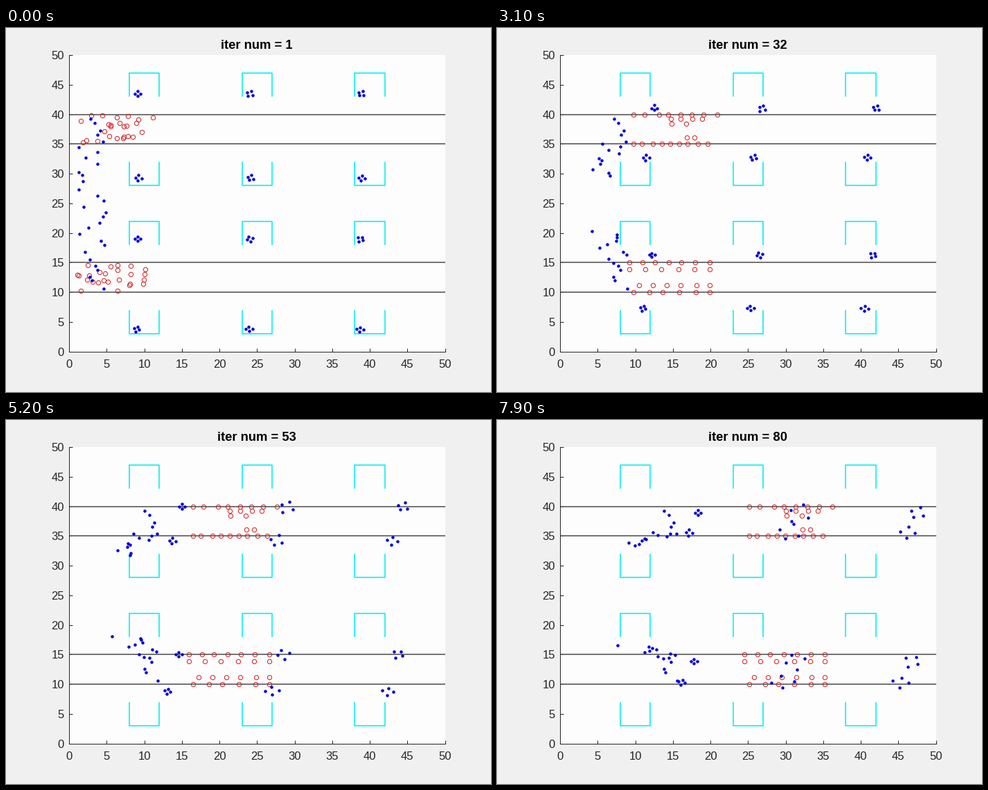
A matplotlib script for the animation above (8000 ms loop, 700 px wide and 525 px high).

```python
import numpy as np
import matplotlib.pyplot as plt
from matplotlib.animation import FuncAnimation

W, H, DPI = 700, 525, 100
FRAMES, STEP = 80, 100
PX = 72 / DPI                     # one pixel in points
BLUE, RED, CYAN = "#0000d2", "#d21e1e", "#00f0f0"
INK, LANE, PAPER, PLOT = "#262626", "#666666", "#f0f0f0", "#fdfdfe"

plt.rcParams["font.family"] = "Liberation Sans"
rng = np.random.default_rng(12)
time = np.arange(FRAMES)[:, None]
progress = time / (FRAMES - 1)


def ease_out(t, power):
    return 1 - (1 - np.clip(t, 0, 1)) ** power


def mix(a, b, t):
    return a + (b - a) * t


# Shelter groups: start, lane edge, end of each row of shelters
KEYS = (0, 38, 79)
ROW_X = ((9.1, 13.3, 18.3), (9.2, 11.9, 17.1), (9.1, 12.9, 17.8), (9.0, 11.5, 16.2))
ROW_Y = ((43.5, 40.5, 38.9), (29.3, 33.5, 35.6), (19.0, 15.7, 13.9), (3.8, 8.1, 10.4))
# Column shift at start and end, and how far the group has spread by the end
COLUMNS = ((0, 0, 0.45), (14.9, 13.3, 1.4), (29.7, 29.1, 0.95))


def shelter_group(row, column):
    """Four walkers around a shared path, spreading once they reach the lane."""
    first, last, spread = column
    angle = rng.uniform(0, 2 * np.pi) + np.arange(4) * np.pi / 2
    radius = rng.uniform(0.7, 1.2, 4)
    size = mix(0.42, spread, np.clip((time - 30) / 49, 0, 1))
    x = np.interp(time, KEYS, ROW_X[row]) + mix(first, last, progress)
    y = np.interp(time, KEYS, ROW_Y[row])
    return np.stack([x + size * radius * np.cos(angle),
                     y + size * radius * np.sin(angle)], axis=2)


def edge_crowd(count, reach=11):
    """Walkers of equal speed from the left side, bending into the nearer lane."""
    x = rng.uniform(1, 5, count)
    y = np.linspace(10.8, 39.4, count) + rng.uniform(-0.3, 0.3, count)
    upper = y > 25
    edge = np.where(upper, 35, 15)
    inward = np.where(upper, 1, -1)
    gap = (edge - y) * inward          # distance still to walk to the lane
    outside = gap > 0
    goal = np.where(outside, edge + inward * (0.8 - 0.25 * gap), y)
    run = np.sqrt(reach ** 2 - np.where(outside, gap, 0) ** 2)
    return np.stack([x + run * progress,
                     mix(y, goal, ease_out(progress, 1.5))], axis=2)


# Ring ranks: final height, count, left and right end, all before the drift
RANKS = {
    37.5: ((40, 8, -0.1, 11), (39.2, 4, 4.8, 9), (38.4, 2, 4.9, 6.9),
           (36.1, 2, 7, 8), (35, 9, -0.1, 9.7)),
    12.5: ((15, 7, -0.7, 10), (13.9, 6, -0.7, 10), (11.2, 6, 0.6, 10),
           (10, 6, -0.1, 10)),
}
DRIFT = 0.3195


def ring_rank(middle, height, count, left, right):
    """Rings scattered in the lane that line up in a rank while drifting right."""
    x = np.linspace(left, right, count)
    x[1:-1] += rng.uniform(-0.2, 0.2, count - 2)
    x0 = x + 1.8 * np.clip(1 - x / 8, 0, 1) + rng.uniform(-0.2, 0.2, count)
    y0 = mix(height, middle, rng.uniform(0, 0.85, count))
    settle = ease_out(time / 20, 3)
    return np.stack([mix(x0, x, settle) + DRIFT * time,
                     mix(y0, height, settle)], axis=2)


dots = np.concatenate([shelter_group(r, c) for c in COLUMNS for r in range(4)]
                      + [edge_crowd(30)], axis=1)
rings = np.concatenate([ring_rank(middle, *rank)
                        for middle, ranks in RANKS.items() for rank in ranks], axis=1)

fig = plt.figure(figsize=(W / DPI, H / DPI), dpi=DPI, facecolor=PAPER)
ax = fig.add_axes([91 / W, 58.35 / H, 542.5 / W, 427.5 / H], facecolor=PLOT)
ax.set(xlim=(0, 50), ylim=(0, 50), xticks=range(0, 51, 5), yticks=range(0, 51, 5))
ax.spines[["top", "right"]].set_visible(False)
ax.spines[["left", "bottom"]].set(color=INK, linewidth=PX)
ax.tick_params(direction="in", length=5 * PX, width=PX, color=INK,
               labelcolor=INK, labelsize=12)
ax.tick_params(axis="x", pad=11.5 * PX)
ax.tick_params(axis="y", pad=7 * PX)

for y in (10, 15, 35, 40):
    ax.plot([0, 50], [y, y], color=LANE, lw=1.8 * PX)
for x in (8, 23, 38):
    for wall, mouth in ((47, 43), (28, 32), (22, 18), (3, 7)):
        ax.plot([x, x, x + 4, x + 4], [mouth, wall, wall, mouth],
                color=CYAN, lw=1.6 * PX, solid_capstyle="butt")

title = fig.text(362 / W, 1 - 30.5 / H, "", ha="center", va="baseline",
                 color="black", size=18.33 * PX, weight="bold")
ring_art, = ax.plot([], [], "o", ms=6.3 * PX, mfc="none", mec=RED, mew=PX)
dot_art, = ax.plot([], [], "o", ms=4.5 * PX, color=BLUE, mew=0)


def draw(n):
    title.set_text(f"iter num = {n + 1}")
    ring_art.set_data(*rings[n].T)
    dot_art.set_data(*dots[n].T)
    return title, ring_art, dot_art


anim = FuncAnimation(fig, draw, frames=FRAMES, interval=STEP,
                     repeat=True, repeat_delay=0)
plt.show()
```
